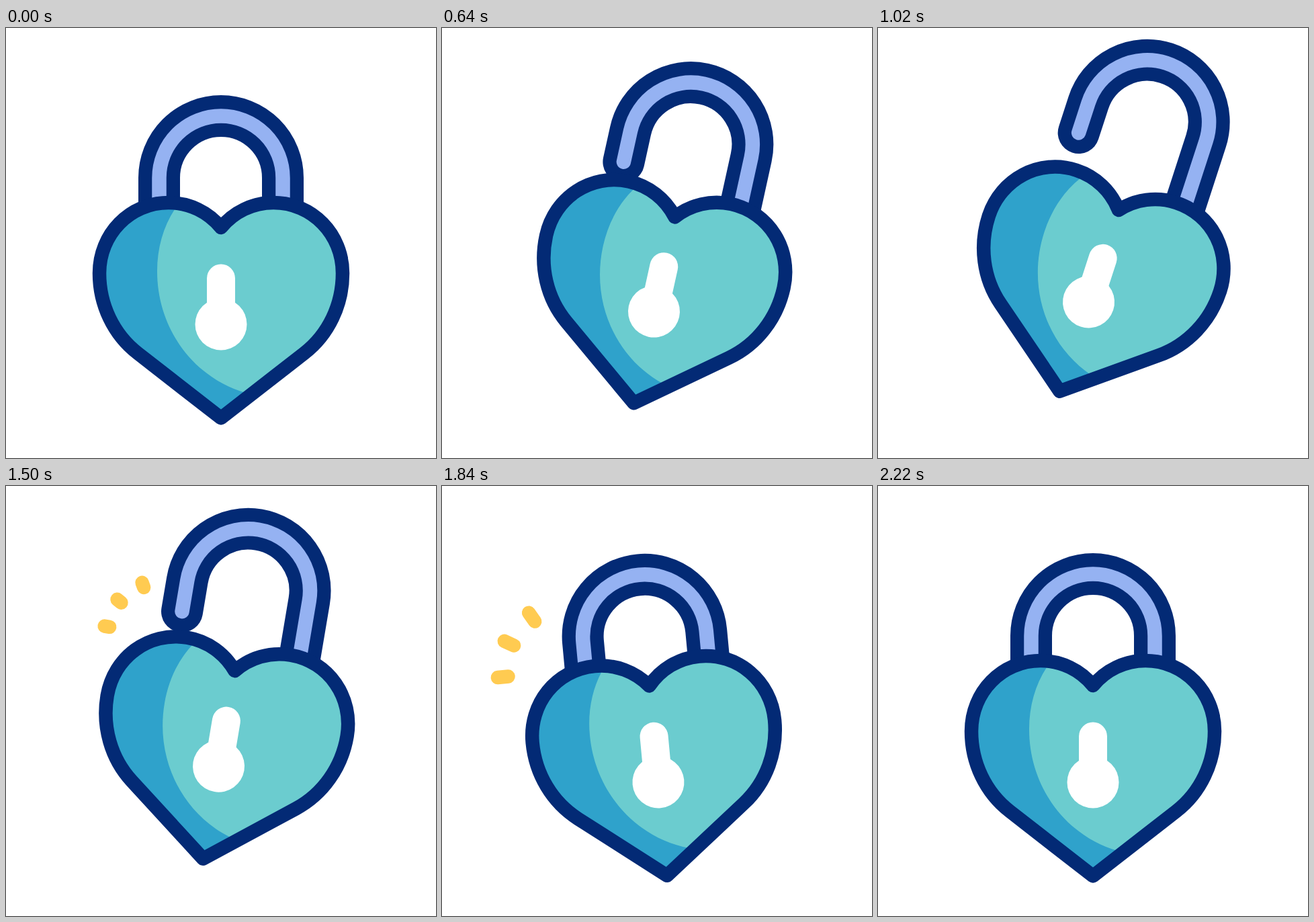
Animation, 640 px wide and 640 px high, one loop 2400 ms. Source, as an HTML page:

```html
<!DOCTYPE html>
<html lang="en">
<head>
<meta charset="utf-8">
<title>Heart padlock</title>
<style>
  html, body { margin: 0; width: 100%; height: 100%; overflow: hidden; background: #fff; }
  svg { display: block; width: 100%; height: 100%; }
</style>
</head>
<body>
<svg viewBox="0 0 640 640" fill="none" stroke-linecap="round" stroke-linejoin="round">
  <defs>
    <path id="heart" d="M320 297C301 274 273 260 242 260C184 260 139 307 139 365C139 412 160 456 196 484L320 580.5L444 484C480 456 501 412 501 365C501 307 456 260 398 260C367 260 339 274 320 297Z"/>
    <path id="bow" d="M228 270V223A92 92 0 0 1 412 223V350"/>
    <clipPath id="inside"><use href="#heart"/></clipPath>
  </defs>
  <g id="lock">
    <g id="shackle">
      <use href="#bow" stroke="#032a75" stroke-width="62"/>
      <use href="#bow" stroke="#95b2f2" stroke-width="21.5"/>
    </g>
    <use href="#heart" fill="#6bcccf"/>
    <path clip-path="url(#inside)" fill="#2fa2cb" d="M251 270C234 296 225 328 225 362C225 450 282 522 357 543L357 620H100V240H270Z"/>
    <use href="#heart" stroke="#032a75" stroke-width="20.5"/>
    <path d="M320 372.5V430" stroke="#fff" stroke-width="42"/>
    <circle cx="320" cy="441" r="38.5" fill="#fff"/>
    <g id="sparks" stroke="#ffcb51" stroke-width="20.5"></g>
  </g>
</svg>
<script>
  const LOOP = 2400;
  const SPARK_LENGTH = 29;
  const lock = document.getElementById('lock');
  const shackle = document.getElementById('shackle');
  const sparkGroup = document.getElementById('sparks');

  // Keyframes: [time in ms, value], eased in and out between neighbours
  const liftKeys = [[200, 0], [1000, 1], [1400, 1], [1700, 0]];
  const angleKeys = [[200, 0], [900, 18], [1400, 18], [1700, -14], [2000, 5], [2200, 0]];
  const headKeys = [[1400, 0], [1700, SPARK_LENGTH]];
  const tailKeys = [[1700, 0], [2000, SPARK_LENGTH]];

  // Inner end of each spark and its direction in degrees
  const sparks = [[125.5, 263.5, 0], [136.5, 225, 30], [166, 197, 60]].map(([x, y, angle]) => {
    const line = document.createElementNS('http://www.w3.org/2000/svg', 'line');
    line.setAttribute('transform', `translate(${x} ${y}) rotate(${angle})`);
    return sparkGroup.appendChild(line);
  });

  function valueAt(keys, time) {
    const next = keys.findIndex(key => key[0] > time);
    if (next < 0) return keys[keys.length - 1][1];
    if (next === 0) return keys[0][1];
    const [t0, v0] = keys[next - 1];
    const [t1, v1] = keys[next];
    const x = (time - t0) / (t1 - t0);
    return v0 + (v1 - v0) * x * x * (3 - 2 * x);
  }

  function draw(time) {
    const lift = valueAt(liftKeys, time);
    lock.setAttribute('transform', `translate(0 ${-32 * lift}) rotate(${valueAt(angleKeys, time)} 320 420)`);
    shackle.setAttribute('transform', `translate(0 ${-64 * lift})`);

    const head = valueAt(headKeys, time);
    const tail = valueAt(tailKeys, time);
    sparkGroup.setAttribute('visibility', head > tail ? 'visible' : 'hidden');
    for (const line of sparks) {
      line.setAttribute('x1', -tail);
      line.setAttribute('x2', -head);
    }
  }

  const start = performance.now();
  function tick() {
    draw((performance.now() - start) % LOOP);
    requestAnimationFrame(tick);
  }
  tick();
</script>
</body>
</html>
```
